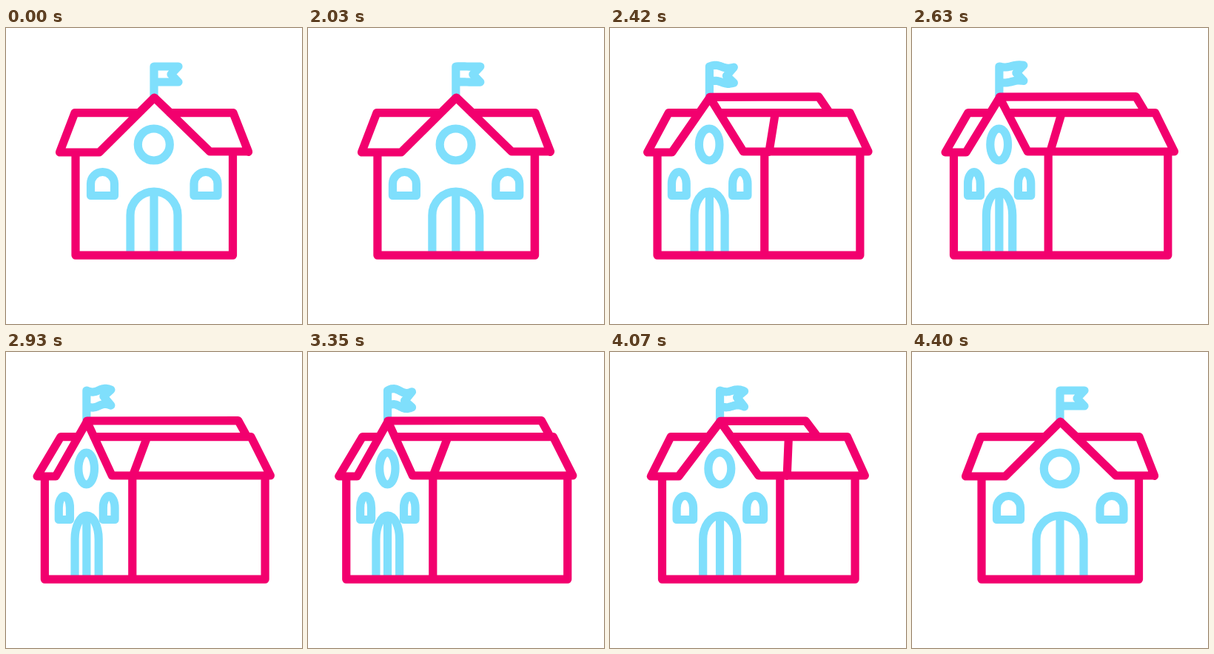
Recreate the animation shown at these times as an HTML page. Size 400 px wide and 400 px high, loop 4.49 s.

```html
<!DOCTYPE html>
<html lang="en">
<head>
<meta charset="utf-8">
<title>School</title>
<style>
  html, body { margin: 0; width: 100%; height: 100%; overflow: hidden; background: #fff; }
  svg { display: block; width: 100%; height: 100%; }
  path { fill: none; stroke-width: 11.2; stroke-linejoin: round; }
  #trim { stroke: #7fdffc; }
  #frame { stroke: #f2006e; stroke-linecap: round; }
</style>
</head>
<body>
<svg viewBox="0 0 400 400">
  <path id="trim"/>
  <path id="frame"/>
</svg>
<script>
const LOOP = 4490, START = 2000, HALF = 1200, STEP = 30;
const trim = document.getElementById('trim');
const frame = document.getElementById('frame');

// x of each moving point: [front view, turned view]
const POINTS = {
  apex: [200.5, 107.5], pole: [200, 107],
  wallL: [94, 51.5], wallM: [306.5, 168], wallR: [306.5, 351],
  topL: [93, 73.5], eaveL: [72.5, 41.5], footL: [126, 66], footR: [275.5, 140.5],
  topM: [307, 188.5], eaveM: [327.5, 168], topR: [307, 331.5], eaveR: [327.5, 358],
  ridge: [200.5, 316], ridgeEnd: [222, 328],
  winA: [114.5, 70.4], winB: [146.5, 85.2], winC: [254, 128.8], winD: [286, 144.2],
  doorL: [168, 91.5], doorR: [232, 123]
};

// cubic-bezier(.35, 0, 0, 1)
function ease(u) {
  if (u <= 0) return 0;
  if (u >= 1) return 1;
  let lo = 0, hi = 1, s = 0.5;
  for (let i = 0; i < 24; i++) {
    s = (lo + hi) / 2;
    const x = 3 * (1 - s) ** 2 * s * 0.35 + s ** 3;
    if (x < u) lo = s; else hi = s;
  }
  return 3 * (1 - s) * s * s + s ** 3;
}

const line = (...pts) => 'M' + pts.map(p => p.map(v => v.toFixed(2)).join(' ')).join('L');

// arched opening from the left foot over the top to the right foot
function arch(l, r, top, ry, bottom) {
  return `M${l} ${bottom}V${top + ry}A${(r - l) / 2} ${ry} 0 0 1 ${r} ${top + ry}V${bottom}`;
}

function ellipse(cx, cy, rx, ry) {
  return `M${cx - rx} ${cy}a${rx} ${ry} 0 1 1 ${2 * rx} 0a${rx} ${ry} 0 1 1 ${-2 * rx} 0z`;
}

// the cloth bends in an S that swings to and fro
function flag(x, t) {
  const power = Math.max(0, Math.min(1, t / 270, (2 * HALF - t) / 300));
  const bend = 2.6 * Math.sin(2 * Math.PI * t / 1100);
  const tip = 2.2 * Math.sin(2 * Math.PI * t / 1000);
  const at = (dx, y) => {
    const k = dx / 33;
    return [x + dx, y + power * (tip * k * k - bend * Math.sin(2 * Math.PI * k))];
  };
  const pts = [[x, 94]];
  for (let dx = 0; dx <= 33; dx += 3) pts.push(at(dx, 52));
  pts.push(at(23, 62.5));
  for (let dx = 33; dx >= 0; dx -= 3) pts.push(at(dx, 73));
  return line(...pts);
}

function draw(t) {
  const p = ease((t < HALF ? t : 2 * HALF - t) / HALF);
  const g = {};
  for (const k in POINTS) g[k] = POINTS[k][0] + (POINTS[k][1] - POINTS[k][0]) * p;

  const TOP = 114.6, EAVE_L = 168, EAVE_R = 167, APEX = 94, BASE = 307.2;
  const cut = foot => g.apex + (foot - g.apex) * (TOP - APEX) / (EAVE_L - APEX);

  trim.setAttribute('d',
    flag(g.pole, t) +
    ellipse(g.pole - 0.2, 157.5, 21.5 - 10.9 * p, 21.5) +
    arch(g.winA, g.winB, 194.5, 16, 226.5) + 'z' +
    arch(g.winC, g.winD, 194.5, 16, 226.5) + 'z' +
    arch(g.doorL, g.doorR, 221, 32, 302) +
    line([g.pole, 221], [g.pole, 302]));

  frame.setAttribute('d',
    line([cut(g.footL), TOP], [g.topL, TOP], [g.eaveL, EAVE_L], [g.footL, EAVE_L],
         [g.apex, APEX], [g.footR, EAVE_R], [g.eaveR, EAVE_R], [g.topR, TOP], [cut(g.footR), TOP]) +
    line([g.apex, APEX - p], [g.ridge, APEX - 1.5 * p], [g.ridgeEnd, TOP]) +
    line([g.topM, TOP], [g.eaveM, EAVE_R + 0.5]) +
    line([g.wallL, EAVE_L], [g.wallL, BASE], [g.wallR, BASE], [g.wallR, EAVE_R]) +
    line([g.wallM, EAVE_R], [g.wallM, BASE]));
}

function tick() {
  const t = performance.now() % LOOP - START;
  draw(Math.max(0, Math.min(2 * HALF, Math.floor(t / STEP) * STEP)));
  requestAnimationFrame(tick);
}
tick();
</script>
</body>
</html>
```
